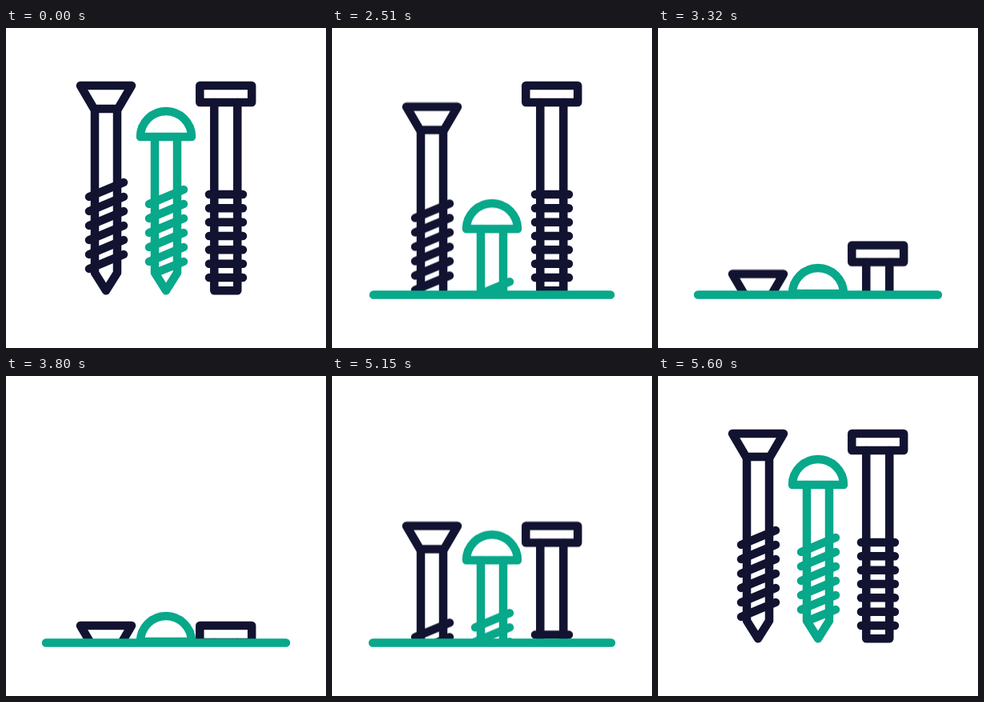
Write an HTML page without scripts that moves like this. It is 400 by 400 pixels and loops after 5660 ms.

```html
<!DOCTYPE html>
<html lang="en">
<head>
<meta charset="utf-8">
<title>Screws</title>
<style>
  html, body { margin: 0; width: 100%; height: 100%; overflow: hidden; background: #fff; }
  svg { display: block; width: 100%; height: 100%; }
  path, rect { fill: none; stroke: currentColor; stroke-width: 10.5; stroke-linecap: round; stroke-linejoin: round; }
  .navy { color: #121331; }
  .green { color: #08a88a; }

  .screw { animation: 5660ms linear infinite; }
  .flat { --depth: 240px; animation-name: flat; }
  .dome { --depth: 196px; animation-name: dome; }
  .bolt { --depth: 240px; animation-name: bolt; }

  /* Sinks start 300 ms apart and last 1200 ms; all rise together */
  @keyframes dome {
    0%, 35.336% { transform: translateY(0); animation-timing-function: cubic-bezier(.34, 0, .34, 1); }
    56.537%, 77.739% { transform: translateY(var(--depth)); animation-timing-function: cubic-bezier(.65, 0, .66, 1); }
    98.94%, 100% { transform: translateY(0); }
  }
  @keyframes flat {
    0%, 40.636% { transform: translateY(0); animation-timing-function: cubic-bezier(.34, 0, .34, 1); }
    61.837%, 77.739% { transform: translateY(var(--depth)); animation-timing-function: cubic-bezier(.65, 0, .66, 1); }
    98.94%, 100% { transform: translateY(0); }
  }
  @keyframes bolt {
    0%, 45.936% { transform: translateY(0); animation-timing-function: cubic-bezier(.34, 0, .34, 1); }
    67.138%, 77.739% { transform: translateY(var(--depth)); animation-timing-function: cubic-bezier(.65, 0, .66, 1); }
    98.94%, 100% { transform: translateY(0); }
  }

  .ground {
    stroke-dasharray: 150 200;
    animation: stretch 5660ms linear infinite, show 5660ms step-end infinite;
  }
  @keyframes stretch {
    0%, 35.336% { stroke-dashoffset: 150; animation-timing-function: cubic-bezier(.25, 0, .2, 1); }
    45.936%, 90.106% { stroke-dashoffset: 0; animation-timing-function: cubic-bezier(.75, 0, .7, 1); }
    98.94%, 100% { stroke-dashoffset: 150; }
  }
  @keyframes show {
    0% { visibility: hidden; }
    35.85% { visibility: visible; }
    98.93%, 100% { visibility: hidden; }
  }
</style>
</head>
<body>
<svg viewBox="0 0 400 400">
  <clipPath id="above"><path d="M0 0H400V333.6H0z"/></clipPath>

  <g clip-path="url(#above)">
    <g class="screw flat navy">
      <path d="M93 72H157L140 101H110z"/>
      <path d="M111 101V306L125 328.3L139 306V101"/>
      <path d="M104 211l43-18m-43 36l43-18m-43 36l43-18m-43 36l43-18m-43 36l43-18m-43 36l43-18"/>
    </g>
    <g class="screw bolt navy">
      <rect x="242.3" y="72" width="64.9" height="21"/>
      <path d="M260.3 93V328.3H289.3V93"/>
      <path d="M254 208h42m-42 17.3h42m-42 17.4h42m-42 17.3h42m-42 17.3h42m-42 17.4h42m-42 17.3h42"/>
    </g>
    <g class="screw dome green">
      <path d="M168 136a32 32 0 0 1 64 0z"/>
      <path d="M186 136V306L200 328.3L214 306V136"/>
      <path d="M179 220l43-18m-43 36l43-18m-43 36l43-18m-43 36l43-18m-43 36l43-18m-30 30l30-12"/>
    </g>
  </g>

  <path class="ground green" d="M200 333.5H50M200 333.5H350"/>
</svg>
</body>
</html>
```
